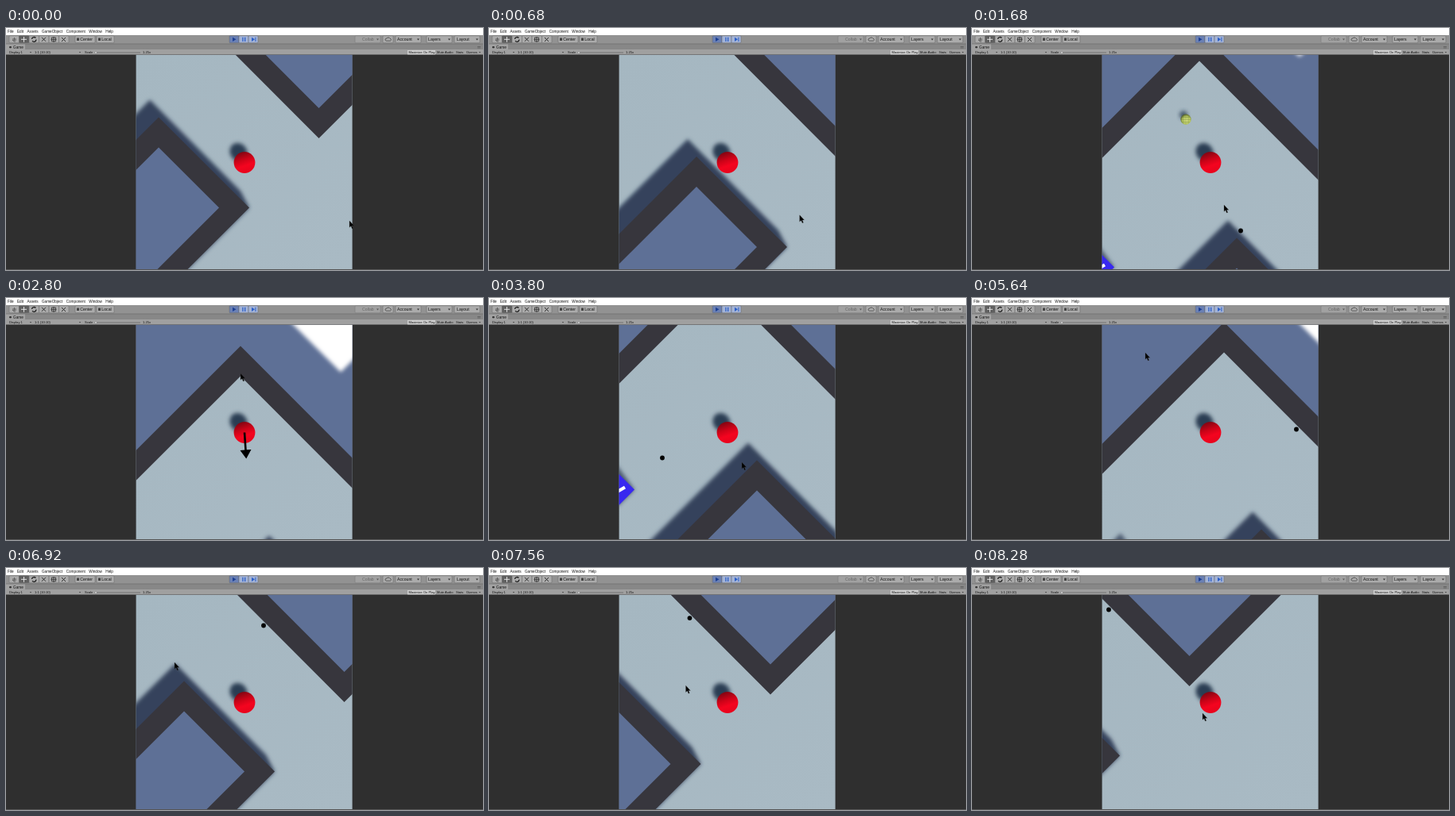
Animation, 600 px wide and 305 px high, one loop 8.32 s. Source, as an HTML page:

```html
<!DOCTYPE html>
<html lang="en">
<head>
<meta charset="utf-8">
<title>Ball game in an editor</title>
<style>
html, body { margin: 0; width: 100%; height: 100%; overflow: hidden; background: #2f2f2f; }
svg { display: block; width: 600px; height: 305px; }
text { font: 5.2px "Liberation Sans", Arial, sans-serif; fill: #111; }
.menu { font-size: 4.7px; }
.small { font-size: 4.1px; }
</style>
</head>
<body>
<svg viewBox="0 0 600 305">
  <defs>
    <clipPath id="view"><rect x="163.6" y="33.5" width="272" height="270.5"/></clipPath>
    <filter id="soft" x="-40%" y="-40%" width="180%" height="180%"><feGaussianBlur stdDeviation="2.6"/></filter>
    <linearGradient id="floor" x1="0" y1="0" x2="1" y2="1">
      <stop offset="0" stop-color="#a5b7c1"/><stop offset="1" stop-color="#a9bac4"/>
    </linearGradient>
    <linearGradient id="red" x1=".3" y1="0" x2=".65" y2="1">
      <stop offset="0" stop-color="#7a0612"/><stop offset=".38" stop-color="#cc0318"/>
      <stop offset=".65" stop-color="#f4041f"/><stop offset="1" stop-color="#e6041c"/>
    </linearGradient>
    <radialGradient id="lime" cx=".56" cy=".6" r=".6">
      <stop offset="0" stop-color="#d5e286"/><stop offset=".65" stop-color="#b3c45c"/><stop offset="1" stop-color="#4c5a2c"/>
    </radialGradient>
    <g id="drop">
      <rect y="9.8" width="32" height="9" rx="1" fill="#ababab" stroke="#666" stroke-width=".5"/>
      <path d="M27 13.5H30L28.5 15.5Z" fill="#333"/>
    </g>
  </defs>

  <rect width="600" height="305" fill="#2f2f2f"/>
  <g clip-path="url(#view)">
    <rect x="163" y="33" width="274" height="271" fill="url(#floor)"/>
    <g class="world">
      <g filter="url(#soft)" fill="#35435c">
        <path d="M-11-22L103 93 114 114-86 314-312 279Z"/>
        <path d="M-177 5L-154 37-175 58-202 30Z" opacity=".8"/>
      </g>
    </g>
    <ellipse cx="292.5" cy="156.5" rx="10.5" ry="12" fill="#2c3c52" transform="rotate(-35 292.5 156.5)" filter="url(#soft)"/>
    <g class="world">
      <path d="M0 0L114 114-186 414-386 386Z" fill="#37363d"/>
      <path d="M0 38L76 114-224 414-386 424Z" fill="#5e7096"/>
      <path d="M-447 177L-47-223 201.5 26.5 701-473-447-473Z" fill="#37363d"/>
      <path d="M-447 139L-47-261 201.5-11.5 663-473-447-473Z" fill="#5e7096"/>
      <path d="M79-228L-1-308 79-388 159-308Z" fill="#fff" filter="url(#soft)"/>
      <path d="M-154 37L-175 16-196 37-175 58Z" fill="#3828f0"/>
      <path d="M-178 41L-166 34" stroke="#fff" stroke-width="4"/>
      <g id="pickup">
        <circle cx="-67" cy="-155" r="5" fill="#2c3c52" opacity=".8" filter="url(#soft)"/>
        <circle cx="-64" cy="-149.3" r="6.6" fill="url(#lime)"/>
        <path d="M-69-152h10M-70-149h12M-69-146h10M-67-154v10M-64-155v12M-61-154v10" stroke="#66753a" stroke-width=".5" fill="none" opacity=".55"/>
      </g>
      <circle id="dot" r="2.9"/>
    </g>
    <circle cx="300" cy="169.5" r="13.4" fill="url(#red)"/>
    <path id="arrow" d="M-1.3 0H1.3V22H7L0 33-7 22H-1.3Z"/>
  </g>
  <path id="cursor" d="M0 0V8.3L1.9 6.6 3.4 10 4.7 9.4 3.3 6.2H5.8Z" stroke="#444" stroke-width=".3"/>

  <!-- Editor bars -->
  <rect width="600" height="9" fill="#fff"/>
  <rect y="9" width="600" height="11" fill="#929292"/>
  <rect y="20" width="600" height="7" fill="#878787"/>
  <rect y="20" width="24" height="7" fill="#a2a2a2"/>
  <rect y="27" width="600" height="6.6" fill="#a0a0a0"/>
  <path d="M0 20H600M0 33.5H600" stroke="#666" stroke-width=".6"/>
  <path d="M0 304.5H600" stroke="#555"/>
  <text class="menu" id="menu" y="6"></text>

  <g id="buttons" stroke="#666" stroke-width=".5"></g>
  <g fill="none" stroke="#222" stroke-width=".9">
    <path d="M9 16V13M10.5 16V12M12 16V13M8 15L10 17H12" stroke="#555"/>
    <path d="M19 14.3H26M22.5 11V17.8" stroke="#eee"/>
    <path d="M32.5 14A2.8 2.8 0 0 1 37.4 12.5M38 14.5A2.8 2.8 0 0 1 33 16.2" stroke-width="1.3"/>
    <path d="M45 11.8L50 16.8M50 11.8L45 16.8"/>
    <path d="M57.5 12H62.5V16.8H57.5ZM60 11V18M56.5 14.4H63.5" stroke-width=".7"/>
    <path d="M70 12L75 17M75 12L70 17"/>
    <path d="M478 16.2H483.5A1.6 1.6 0 0 0 483 13.2 2.4 2.4 0 0 0 479 13 1.7 1.7 0 0 0 478 16.2Z" stroke-width=".6"/>
  </g>
  <path d="M89 12.5H92V16H89ZM116 12.5H119V16H116Z" fill="#444"/>
  <path d="M285 11.7L289.5 14.3 285 17Z" fill="#1c3f94"/>
  <path d="M297.3 11.7H298.6V17H297.3ZM300 11.7H301.3V17H300ZM309 11.7L313 14.3 309 17ZM313.4 11.7H314.4V17H313.4Z" fill="#2c5fc8"/>
  <text x="93.3" y="16.1">Center</text><text x="120.3" y="16.1">Local</text>
  <use href="#drop" x="439" opacity=".6"/><text x="448" y="16.1" opacity=".4">Collab</text>
  <use href="#drop" x="490"/><text x="492" y="16.1">Account</text>
  <use href="#drop" x="529"/><text x="531" y="16.1">Layers</text>
  <use href="#drop" x="564"/><text x="567" y="16.1">Layout</text>

  <path d="M4 24.2C4 22.6 7 22.6 7 24.2S4 25.8 4 24.2Z" fill="#333"/>
  <text class="menu" x="9" y="25.7">Game</text>
  <path d="M593 23.5H597M593 25H597" stroke="#444" stroke-width=".5"/>
  <path d="M112 31H169" stroke="#666" stroke-width=".8"/>
  <circle cx="113" cy="31" r="1.4" fill="#ddd" stroke="#555" stroke-width=".4"/>
  <rect x="505" y="28" width="35" height="5.4" fill="#d0d0d0"/>
  <path d="M30 30H32L31 31.5ZM92 30H94L93 31.5ZM595 30H597L596 31.5Z" fill="#333"/>
  <g>
    <text class="small" x="4" y="32">Display 1</text><text class="small" x="36" y="32">1:1 (10:10)</text>
    <text class="small" x="99" y="32">Scale</text><text class="small" x="172" y="32">1.25x</text>
    <text class="small" x="506.5" y="32">Maximize On Play</text><text class="small" x="542" y="32">Mute Audio</text>
    <text class="small" x="566" y="32">Stats</text><text class="small" x="579" y="32">Gizmos</text>
  </g>
</svg>
<script>
const $ = id => document.getElementById(id);
const LOOP = 8320, STEP = 40, BALL = { x: 300, y: 169.5 };

function add(parent, tag, attrs, text = "") {
  const el = document.createElementNS("http://www.w3.org/2000/svg", tag);
  for (const k in attrs) el.setAttribute(k, attrs[k]);
  el.textContent = text;
  parent.append(el);
}
const button = (x, width, fill = "#ababab") =>
  add($("buttons"), "rect", { x, y: 9.8, width, height: 9, rx: 1, fill });

"File Edit Assets GameObject Component Window Help".split(" ")
  .forEach((word, i) => add($("menu"), "tspan", { dx: i ? 4.4 : 2 }, word));
for (let i = 0; i < 6; i++) button(4 + 12.5 * i, 12.5, i == 1 ? "#606060" : undefined);
for (let i = 0; i < 3; i++) button(281 + 12 * i, 12, i ? "#a3b3d6" : "#6a80b4");
button(87, 25);
button(114, 22);
button(474, 13);

// Walls lie at 45 degrees, so a bounce mirrors only x - y (across) or x + y (along)
const ROCK = { across: 31 }, RIGHT = { across: 154 }, LEFT = { along: -251 };
const point = (x, y) => ({ x, y });

// Each pose ends a leg; "off" is the wall met on the way, "hit" the mark left behind
const poses = [
  { t: 0, ball: point(108, 57), cursor: point(432, 243) },
  { t: 1680, ball: point(-33, -95), cursor: point(317, 223), off: ROCK, hit: point(5, -9) },
  { t: 2800, ball: point(-42, -152), cursor: point(295, 95), off: LEFT },
  { t: 3800, ball: point(-37, -35), cursor: point(318, 207), hit: point(-119, -3) },
  { t: 5640, ball: point(-64, -122), cursor: point(218, 69), off: RIGHT, hit: point(44, -126) },
  { t: 6920, ball: point(76, 27), cursor: point(212, 119), off: RIGHT, hit: point(100, -70) },
  { t: 8280, ball: point(228, 47), cursor: point(290, 183), hit: point(100, -70) }
];

const mix = (a, b, u) => a + (b - a) * u;
const smooth = u => u * u * (3 - 2 * u);

// Even speed from a to b, reflected at the wall if there is one
function travel(a, b, wall, u) {
  if (wall === undefined) return mix(a, b, u);
  return wall + Math.sign(a - wall) * Math.abs(mix(Math.abs(a - wall), -Math.abs(b - wall), u));
}

function ballAt(a, b, u) {
  const off = b.off || {};
  const across = travel(a.ball.x - a.ball.y, b.ball.x - b.ball.y, off.across, u);
  const along = travel(a.ball.x + a.ball.y, b.ball.x + b.ball.y, off.along, u);
  return point((along + across) / 2, (along - across) / 2);
}

const move = (el, p, more = "") => el.setAttribute("transform", `translate(${p.x} ${p.y})${more}`);
const show = (el, on) => el.style.display = on ? "" : "none";
const worlds = document.querySelectorAll(".world");

function draw(now) {
  const t = Math.floor(now % LOOP / STEP) * STEP;
  const next = Math.max(1, poses.findIndex(p => p.t >= t));
  const a = poses[next - 1], b = poses[next], u = (t - a.t) / (b.t - a.t);

  const ball = ballAt(a, b, u);
  worlds.forEach(w => move(w, point(BALL.x - ball.x, BALL.y - ball.y)));

  const cursor = point(mix(a.cursor.x, b.cursor.x, smooth(u)), mix(a.cursor.y, b.cursor.y, smooth(u)));
  move($("cursor"), cursor);

  // The shot points away from the pulled cursor
  const aim = Math.atan2(BALL.y - cursor.y, BALL.x - cursor.x) * 180 / Math.PI - 90;
  move($("arrow"), BALL, ` rotate(${aim})`);
  show($("arrow"), t >= 2520 && t < 2920);

  const { hit } = u < 0.5 ? a : b;
  show($("dot"), hit);
  if (hit) move($("dot"), hit);
  show($("pickup"), t < 2120);
}

const start = performance.now();
function tick() {
  draw(performance.now() - start);
  requestAnimationFrame(tick);
}
tick();
</script>
</body>
</html>
```
